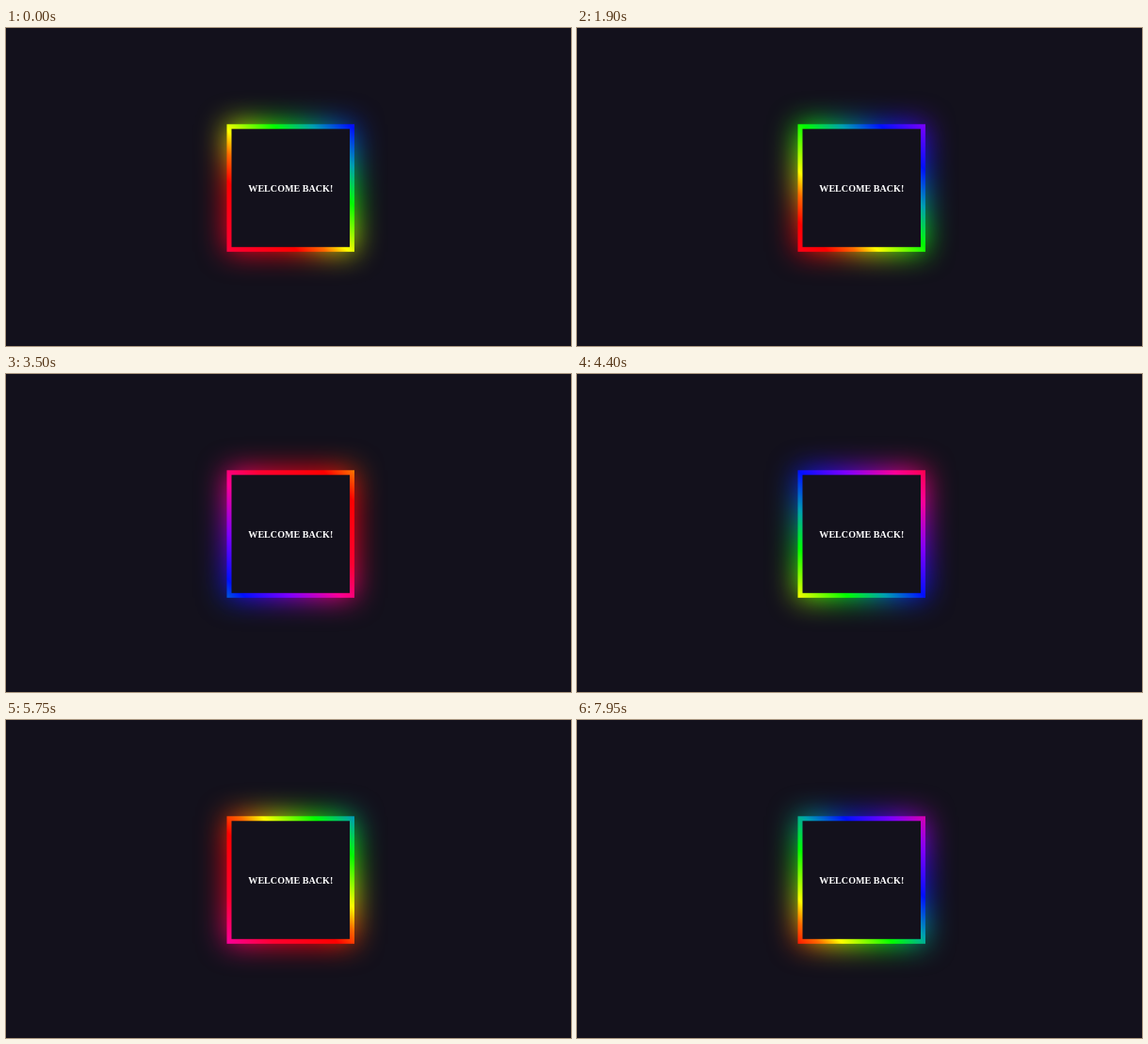
These frames come from a looping animation (600 by 338 pixels, 8000 ms). An HTML page:

```html
<!DOCTYPE html>
<html lang="en">
<head>
<meta charset="utf-8">
<title>Welcome back</title>
<style>
  html, body { margin: 0; width: 100%; height: 100%; overflow: hidden; background: #13111c; }
  svg { display: block; width: 100vw; height: 100vh; }
  text { font: bold 10.1px "Liberation Serif", "Times New Roman", serif; fill: #fff; }
</style>
</head>
<body>
<svg viewBox="0 0 600 338">
  <defs>
    <linearGradient id="rainbow" gradientUnits="userSpaceOnUse" spreadMethod="repeat"></linearGradient>
    <filter id="blur" filterUnits="userSpaceOnUse" x="150" y="20" width="310" height="300"
      color-interpolation-filters="sRGB">
      <feGaussianBlur stdDeviation="15"/>
    </filter>
  </defs>
  <rect width="600" height="338" fill="#13111c"/>
  <rect x="234.5" y="102.3" width="135.5" height="135.5" fill="url(#rainbow)" filter="url(#blur)"/>
  <rect x="234.5" y="102.3" width="135.5" height="135.5" fill="url(#rainbow)"/>
  <rect x="239.5" y="107.3" width="125.5" height="125.5" fill="#13111c"/>
  <text x="302.3" y="174" text-anchor="middle">WELCOME BACK!</text>
</svg>
<script>
  const LOOP = 8000, STEP = 50;
  const SIZE = 135.5, LEFT = 234.5, BOTTOM = 237.8;
  // Distances along the gradient are in box sides; the colours repeat every PERIOD.
  const PERIOD = 3, START = -0.1;
  const SPEED = 0.945, TURN = 1.12;
  const STOPS = [
    [-0.1, '#ffff00'], [0.3, '#00ff00'], [0.6, '#00a0b0'], [0.9, '#0010ff'],
    [1.25, '#7a00ff'], [1.65, '#fb0094'], [2, '#ff0030'], [2.5, '#ff0000'],
    [2.72, '#ff6a00'], [2.9, '#ffff00']
  ];

  const gradient = document.getElementById('rainbow');

  for (const [pos, color] of STOPS) {
    const stop = document.createElementNS('http://www.w3.org/2000/svg', 'stop');
    stop.setAttribute('offset', (pos - START) / PERIOD);
    stop.setAttribute('stop-color', color);
    gradient.append(stop);
  }

  function setEnd(n, pos) {
    gradient.setAttribute('x' + n, LEFT + pos * SIZE / 2);
    gradient.setAttribute('y' + n, BOTTOM - pos * SIZE / 2);
  }

  // The colours slide one way, then back at the same speed.
  function draw(ms) {
    const shift = -SPEED * Math.abs(ms / 1000 - TURN);
    setEnd(1, START - shift);
    setEnd(2, START - shift + PERIOD);
  }

  function tick() {
    const ms = performance.now() % LOOP;
    draw(Math.floor(ms / STEP) * STEP);
    requestAnimationFrame(tick);
  }

  tick();
</script>
</body>
</html>
```
